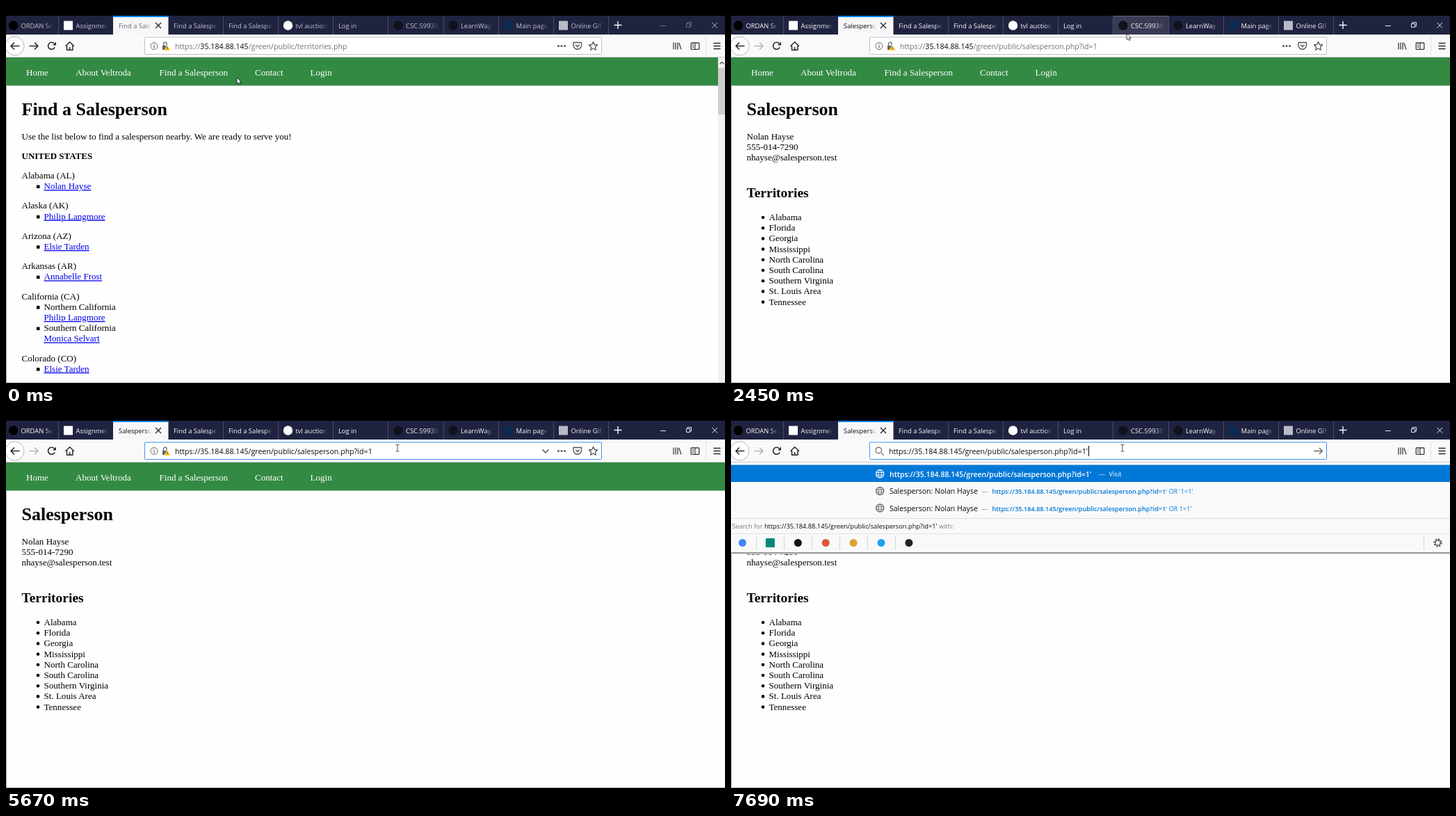
Animation, 1034 px wide and 542 px high, one loop 8 s. Source, as an HTML page:

```html
<!DOCTYPE html>
<html lang="en">
<head>
<meta charset="utf-8">
<title>Find a Salesperson</title>
<style>
html, body { margin: 0; width: 100%; height: 100%; overflow: hidden; background: #fff; }
svg { display: block; }
text { white-space: pre; }
.ui { font-family: 'Open Sans', 'Noto Sans', sans-serif; }
.page { font-family: 'Liberation Serif', 'Times New Roman', serif; }
</style>
</head>
<body>
<svg id="stage" width="1034" height="542" viewBox="0 0 1034 542"></svg>
<script>
const LOOP = 8000;
const INK = '#2a2a2e', BLUE = '#0a84ff', SELECT = '#0078d7', BAR = '#202340';
const BASE = 'https://35.184.88.145/green/public/';
const URL1 = BASE + 'salesperson.php?id=1';
const PERSON = 'Nolan Hayse';

// time, pointer kind, x, y
const steps = [
  [0, 'arrow', 332, 103], [140, 'arrow', 231, 123.5], [280, 'arrow', 170, 172],
  [410, 'arrow', 88, 225], [560, 'arrow', 86, 228], [710, 'arrow', 84, 238],
  [840, 'arrow', 84, 244], [990, 'hand', 87, 258], [1290, 'hand', 87, 258],
  [1440, 'hand', 87, 258], [1570, 'hand', 87, 258], [1720, 'beam', 88.5, 255.5],
  [1870, 'beam', 88.5, 255.5], [2020, 'arrow', 190, 205], [2150, 'arrow', 307, 133],
  [2300, 'arrow', 440, 38], [2450, 'arrow', 569, 39.5], [2600, 'beam', 565, 60],
  [2750, 'beam', 564, 60], [2880, 'beam', 563, 56], [3000, 'beam', 563, 53],
  [4180], [4640], [5060], [5670], [5960], [6110], [6670], [7260], [7690]
];

const rect = (x, y, w, h, fill, more = '') =>
  `<rect x="${x}" y="${y}" width="${w}" height="${h}" fill="${fill}" ${more}/>`;
const disc = (x, y, r, fill, more = '') => `<circle cx="${x}" cy="${y}" r="${r}" fill="${fill}" ${more}/>`;
const line = (d, color = INK, w = 1.3, fill = 'none') =>
  `<path d="${d}" stroke="${color}" stroke-width="${w}" fill="${fill}" stroke-linejoin="round"/>`;
const ui = (x, y, s, size, fill, weight = 400) =>
  `<text class="ui" x="${x}" y="${y}" font-size="${size}" fill="${fill}" font-weight="${weight}">${s}</text>`;
const text = (x, y, s, more = '', size = 13.05) =>
  `<text class="page" x="${x}" y="${y}" font-size="${size}" ${more}>${s}</text>`;
const bold = (x, y, s, size) => text(x, y, s, 'font-weight="700"', size);
const link = (y, s) => text(54.5, y, s, 'fill="#00e" text-decoration="underline"');
const fade = (id, color) => `<linearGradient id="${id}"><stop stop-color="${color}" stop-opacity="0"/>` +
  `<stop offset="1" stop-color="${color}"/></linearGradient>`;

const defs = `<defs>${fade('dark', BAR)}${fade('lit', '#383b53')}${fade('light', '#f7f7f9')}</defs>`;

// left edge, label, icon shape and colour
const tabs = [
  [-4, 'ORDAN Se', 'disc', '#000'], [75, 'Assignment', 'box', '#fff'], [154, ''],
  [233, 'Find a Salesperson'], [312, 'Find a Salesperson'], [391, 'tvl auction', 'disc', '#fff'],
  [470, 'Log in'], [549.5, 'CSC.59938', 'disc', '#10121c'], [628.5, 'LearnWay,', 'disc', '#10121c'],
  [708, 'Main page', 'box', '#0a2a52'], [787, 'Online GIF', 'box', '#b9bcc6']
];

function tabBar(t) {
  const on = t >= 1290, hover = t < 2300 ? -1 : t < 2450 ? 5 : t < 2600 ? 7 : -1;
  const color = on ? '#f9f9fa' : '#c3c4cc';
  let s = rect(0, 0, 1034, 14, '#000') + rect(0, 14, 1034, 27, BAR);
  tabs.forEach(([x, label, shape, fill], i) => {
    if (i == 2) return;
    const lit = i == hover;
    if (lit) s += rect(x + .5, 14, 79, 27, '#383b53') + rect(x + .5, 14, 79, 1, '#64677a');
    s += ui(x + (shape ? 25.5 : 8), 31.5, label.slice(0, 15), 9.4, color);
    s += rect(x + 61, 20, 10, 16, `url(#${lit ? 'lit' : 'dark'})`) + rect(x + 71, 20, 8, 16, lit ? '#383b53' : BAR);
    if (shape) s += shape == 'disc' ? disc(x + 14.5, 28, 6.7, fill) : rect(x + 8, 21.5, 13, 13, fill);
    s += rect(Math.round(x + 79), 15, 1, 26, '#4b4d63');
  });
  s += rect(154, 14, 79.5, 27, '#f7f7f9') + rect(154, 14, 79.5, 2, BLUE);
  const busy = t >= 1440 && t < 2020;
  s += ui(busy ? 180 : 162, 31.5, t < 1720 ? 'Find a Salesp' : 'Salesperson', 9.4, on ? '#0c0c0d' : '#66666c');
  s += rect(200, 20, 9, 16, 'url(#light)') + rect(209, 20, 24, 16, '#f7f7f9');
  if (t >= 1440 && t < 1720) s += disc(t < 1570 ? 165 : 172, 28, 2.8, BLUE);
  if (t >= 1720 && t < 1870) s += disc(168.5, 28, 9.5, '#9fcdff');
  if (t >= 1870 && t < 2020) s += disc(168.5, 28, 11, '#dcecfe');
  s += line('M215 24l8 8M223 24l-8 8', INK, 1.4);
  const win = on ? '#e8e8ee' : '#6f7183';
  return s + line('M874.5 27.5h11M880 22v11', '#f9f9fa', 1.4) + line('M941 28.5h8', win, 1) +
    line('M978.5 25.5h5v5h-5zM980 25v-1.5h5.5v5.5h-1.5', win, 1) +
    line('M1015.5 24l7.5 7.5M1023 24l-7.5 7.5', on ? win : '#b9bac4', 1);
}

const globe = (y, c) => disc(214.2, y, 5.6, 'none', `stroke="${c}" stroke-width="1.2"`) +
  line(`M208.6 ${y - 1.8}h11.2M208.6 ${y + 1.8}h11.2M214.2 ${y - 5.6}q-5 5.6 0 11.2q5-5.6 0-11.2`, c, .9);

function toolbar(t) {
  const focus = t >= 2880, typed = t >= 5960;
  const forward = t < 1720 ? INK : '#b5b5b8', reload = t >= 1870 && t < 2450 ? '#a5a5a8' : INK;
  let s = rect(0, 41, 1034, 33, '#f9f9fa') + rect(0, 73, 1034, 1, '#ccccce');
  s += disc(12.5, 57.5, 13.5, '#fff', 'stroke="#b9b9bb"') + line('M19.5 57.5H7M12 52.5l-5 5l5 5', INK, 1.6);
  s += line('M33.5 57.5H46M41 52.5l5 5l-5 5', forward, 1.6);
  if (t >= 1440 && t < 1870) s += line('M60.5 52.5l10 10M70.5 52.5l-10 10', '#98989c', 1.5);
  else s += line('M70.2 59.3a5 5 0 1 1-.8-5.3', reload, 1.6) + `<path d="M72 51.5v5h-5z" fill="${reload}"/>`;
  s += line('M85.5 57.8l6.2-6l6.2 6M87.5 57v6.3h8.4V57M91.7 63v-4', INK, 1.5);

  const edge = focus ? '#3f95f0' : t >= 2600 ? '#8f8f93' : '#c2c2c4';
  s += rect(199.5, 45, 657, 24.5, '#fff', `stroke="${edge}" rx="1"`);
  if (typed) {
    s += line('M216.5 60.5l3.3 3.3M208 56.5a4.3 4.3 0 1 0 8.6 0a4.3 4.3 0 1 0-8.6 0', '#77777b', 1.4);
    s += ui(227, 61.7, URL1 + "'", 10.65, '#0c0c0d') + line('M838.5 57.5h12M846 53l4.5 4.5l-4.5 4.5', '#66666a', 1.4);
  } else {
    s += disc(213, 57.5, 5, 'none', 'stroke="#66666a"') + rect(212.4, 56.5, 1.2, 4, '#66666a') +
      rect(212.4, 54.3, 1.2, 1.2, '#66666a');
    s += rect(225, 57, 7.5, 6, '#626266') + line('M226.5 57v-2.5a2.3 2.3 0 0 1 4.6 0v2', '#626266', 1.3) +
      '<path d="M232 56.5l4.7 7.5h-9.4z" fill="#ffbf00" stroke="#fff" stroke-width=".6"/>' + rect(231.6, 59, .9, 2.5, '#333');
    const path = t < 1720 ? 'territories.php' : 'salesperson.php?id=1';
    if (focus && t < 4180) s += rect(243.5, 50, 284.5, 15, SELECT) + ui(243, 61.7, URL1, 10.65, '#fff');
    else if (focus) s += ui(243, 61.7, URL1, 10.65, '#0c0c0d');
    else s += ui(243, 61.7, `https://<tspan fill="#0c0c0d">35.184.88.145</tspan>/green/public/${path}`, 10.65, '#737378');
    if (focus) s += line('M771.5 55.5l4.5 4.5l4.5-4.5', '#55555a', 1.6);
    s += [794.5, 799, 803.5].map(x => disc(x, 57.5, 1.5, '#55555a')).join('');
    s += line('M816 52.5h11.5v4a5.7 5.7 0 0 1-11.5 0zM819 55.8l2.8 2.7l2.8-2.7', '#55555a', 1.4);
    s += line('M844.5 51.5l1.8 4l4.3.5l-3.2 2.9l.9 4.3l-3.8-2.2l-3.8 2.2l.9-4.3l-3.2-2.9l4.3-.5z', '#55555a', 1.3);
  }
  // caret blink
  const caretOn = t >= 4180 && t < 4640 || t >= 5060 && t < 5670 || t >= 5960 && t < 6110 ||
    t >= 6670 && t < 7260 || t >= 7690;
  if (caretOn) s += rect(typed ? 514 : 528, 50, 1, 15, '#000');

  s += line('M960 52.5v10M963 52.5v10M966 52.5v10M967.8 53l3.2 9.5', '#4a4a4f', 1.4);
  s += rect(985.2, 53, 11.6, 9.4, 'none', 'stroke="#3a3a3e" stroke-width="1.3" rx="1"') +
    rect(990.5, 53, 1, 9, INK) + line('M987 55.5h2.5M987 57.5h2.5M987 59.5h2.5', INK, .8);
  return s + rect(1006, 44, 1, 27, '#e3e3e5') + line('M1017.5 53.5h10M1017.5 57.5h10M1017.5 61.5h10', INK, 1.4);
}

function navBar() {
  const items = [[29, 'Home'], [100, 'About Veltroda'], [220.5, 'Find a Salesperson'], [358, 'Contact'], [437.5, 'Login']];
  return rect(0, 74, 1034, 40.5, '#338a43') + items.map(([x, s]) => text(x, 100, s, 'fill="#fff"')).join('');
}

const states = [
  ['Alabama (AL)', PERSON], ['Alaska (AK)', 'Philip Langmore'], ['Arizona (AZ)', 'Elsie Tarden'],
  ['Arkansas (AR)', 'Annabelle Frost'],
  ['California (CA)', '*Northern California', 'Philip Langmore', '*Southern California', 'Monica Selvart'],
  ['Colorado (CO)', 'Elsie Tarden']
];

function listPage() {
  let s = bold(22.5, 156.5, 'Find a Salesperson', 26) + bold(22.5, 219.5, 'UNITED STATES', 13) +
    text(22.5, 191.5, 'Use the list below to find a salesperson nearby. We are ready to serve you!');
  let y = 248;
  for (const [name, ...rows] of states) {
    s += text(22.5, y, name);
    rows.forEach((row, i) => {
      y += 15.2;
      const area = row[0] == '*';
      if (area || !i) s += rect(44, y - 5.7, 4.5, 4.5, '#000');
      s += area ? text(54.5, y, row.slice(1)) : link(y, row);
    });
    y += 28.2;
  }
  return s + rect(1024, 74, 10, 468, '#f0f0f0') + rect(1024, 89, 10, 67, '#cdcdcd') +
    line('M1026.5 83.5l3-3l3 3', '#505050', 1.3);
}

function personPage() {
  const areas = ['Alabama', 'Florida', 'Georgia', 'Mississippi', 'North Carolina', 'South Carolina',
    'Southern Virginia', 'St. Louis Area', 'Tennessee'];
  return bold(22.5, 156.5, 'Salesperson', 26) + text(22.5, 191.5, PERSON) + text(22.5, 206.7, '555-014-7290') +
    text(22.5, 222, 'nhayse@salesperson.test') + bold(22.5, 275, 'Territories', 19.5) +
    areas.map((a, i) => disc(46, 304 + i * 15.2, 2.3, '#000') + text(54.5, 308 + i * 15.2, a)).join('');
}

function dropdown(full) {
  const h = full ? 49 : 0, q = URL1 + "'";
  let s = rect(0, 74, 1034, 81 + h, '#f9f9fa') + rect(0, 77.5, 1034, 24.5, SELECT) + globe(90.3, '#fff');
  s += ui(228, 94.7, q, 10.5, '#fff', 600) + ui(529, 94.3, '—', 9.25, '#cfe4f7') + ui(543.5, 94.3, 'Visit', 9.4, '#fff');
  if (full) [["OR '1=1'", 115], ["OR 1=1'", 139.5]].forEach(([end, y]) => {
    s += globe(y, '#66666a') + ui(228, y + 4, 'Salesperson: ' + PERSON, 10.5, '#0c0c0d') + ui(360.5, y + 4, '—', 9.25, '#8a8a8e');
    s += ui(375.5, y + 4, `<tspan font-weight="600">${q}</tspan> ${end}`, 9.12, SELECT);
  });
  s += rect(0, 105 + h, 1034, 1, '#dcdcde') + rect(0, 127 + h, 1034, 1, '#e2e2e4');
  s += ui(1.5, 120.3 + h, `Search for <tspan fill="#0c0c0d">${q}</tspan> with:`, 9.25, '#7b7b80');
  const y = 140.5 + h;
  const marks = ['#4285f4', '#00897b', '#111', '#de5833', '#e0a030', '#1da1f2', '#222'];
  marks.forEach((c, i) => {
    const x = 16.5 + i * 39.9;
    s += i == 1 ? rect(x - 6.5, y - 6.5, 13, 13, c) : disc(x, y, 5.5, c);
    if (i < 6) s += rect(Math.round(x + 19.5), y - 10, 1, 20, '#d5d5d7');
  });
  s += rect(996, y - 10, 1, 20, '#d5d5d7') + disc(1016.5, y, 3.7, 'none', 'stroke="#4a4a4f" stroke-width="1.4"') +
    disc(1016.5, y, 5.3, 'none', 'stroke="#4a4a4f" stroke-width="1.8" stroke-dasharray="2 2.163"');
  return s + rect(0, 154 + h, 1034, 2, '#9a9a9d') + rect(0, 156 + h, 1034, 1, '#e4e4e6');
}

const pointers = {
  arrow: line('M0 0V9L2.2 7L3.8 10.2L5.2 9.5L3.7 6.5H6.5Z', '#000', .7, '#fff'),
  beam: line('M-2.5-4.5h2l.5.5l.5-.5h2M0-4v8.5M-2.5 5h2l.5-.5l.5.5h2', '#333', .9),
  hand: line('M-1.5 3V-3.5q1-1.5 2 0V0l4 1q1 .5 1 2l-1 3v2H0L-3.5 3.5q.5-1.5 2 0', '#000', .8, '#fff')
};

function draw(t, [kind, x, y]) {
  return defs + rect(0, 0, 1034, 542, '#fefefe') + navBar() + (t < 1720 ? listPage() : personPage()) +
    rect(0, 114, 1, 428, '#a8a8aa') + rect(0, 541, 1034, 1, '#b5b5b7') + tabBar(t) + toolbar(t) +
    (t >= 5960 ? dropdown(t >= 6110) : '') + `<g transform="translate(${x} ${y})">${pointers[kind]}</g>`;
}

const stage = document.getElementById('stage');
let shown = -1;
function tick() {
  const t = performance.now() % LOOP;
  const i = steps.findLastIndex(s => s[0] <= t);
  if (i != shown) {
    const pointer = steps.slice(0, i + 1).findLast(s => s.length > 1).slice(1);
    stage.innerHTML = draw(steps[i][0], pointer);
    shown = i;
  }
  requestAnimationFrame(tick);
}
tick();
</script>
</body>
</html>
```
